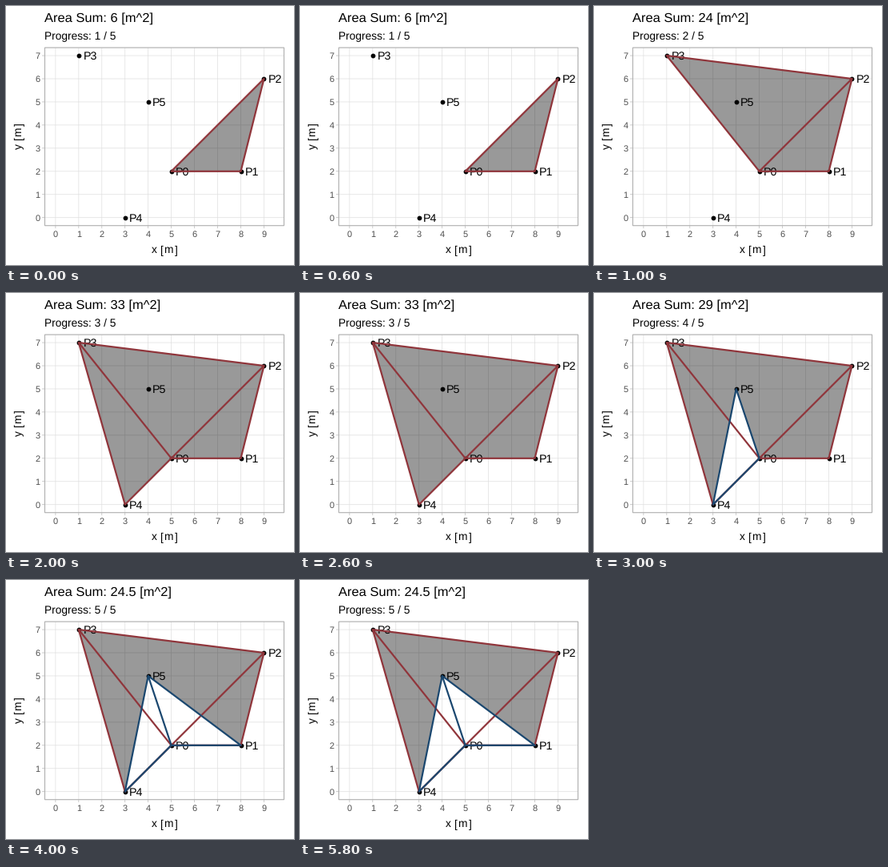
Recreate the animation shown at these times as a matplotlib script. Size 360 by 324 pixels, loop 7000 ms.

```python
import matplotlib.pyplot as plt
import numpy as np
from matplotlib.animation import FuncAnimation

W, H, DPI = 360, 324, 90
PX = 72 / DPI  # points per pixel
STEP, X0, Y0 = 28.95, 61.9, 264.7
LEFT, RIGHT, TOP, BOTTOM = 48.5, 347.5, 52.1, 274.7
RED, BLUE = "#90353b", "#1a476f"
POINTS = np.array([(5, 2), (8, 2), (9, 6), (1, 7), (3, 0), (4, 5)])
TRIANGLES = 5

plt.rcParams.update({"font.family": "Liberation Sans",
                     "text.hinting": "none",
                     "path.snap": False})


def to_px(p):
    return np.asarray(p) * (STEP, -STEP) + (X0, Y0)


def signed_area(a, b, c):
    (ux, uy), (vx, vy) = b - a, c - a
    return (ux * vy - uy * vx) / 2


def fan(i):
    """Corner indices of the i-th triangle around P0."""
    return [0, i + 1, (i + 1) % TRIANGLES + 1]


fig = plt.figure(figsize=(W / DPI, H / DPI), dpi=DPI, facecolor="white")
ax = fig.add_axes([0, 0, 1, 1])
ax.set(xlim=(0, W), ylim=(H, 0))
ax.axis("off")


def line(x, y, color, width, z):
    ax.plot(x, y, color=color, lw=width * PX, zorder=z, solid_capstyle="butt")


def label(x, y, s, size=11, color="black", **kw):
    return ax.text(x, y, s, fontsize=size, color=color, zorder=4, **kw)


def with_unit(name):
    return rf"$\mathregular{{{name}\ [\hspace{{0.1}}m\hspace{{0.1}}]}}$"


def draw_axes():
    tick = 3.4
    for n in range(10):
        x = X0 + n * STEP
        line([x, x], [TOP, BOTTOM], "#dedede", 0.67, 1)
        line([x, x], [BOTTOM, BOTTOM + tick], "#b3b3b3", 0.67, 1)
        label(x, 289.3, str(n), 8.8, "#4d4d4d", ha="center")
    for n in range(8):
        y = Y0 - n * STEP
        line([LEFT, RIGHT], [y, y], "#dedede", 0.67, 1)
        line([LEFT - tick, LEFT], [y, y], "#b3b3b3", 0.67, 1)
        label(42.4, y + 4, str(n), 8.8, "#4d4d4d", ha="right")
    ax.add_patch(plt.Rectangle((LEFT, TOP), RIGHT - LEFT, BOTTOM - TOP,
                               fill=False, ec="#b3b3b3", lw=1.2 * PX, zorder=2))
    label(198, 310, with_unit("x"), ha="center")
    label(26, 163.4, with_unit("y"), rotation=90, ha="right", va="center")


def draw_points():
    xy = to_px(POINTS)
    ax.plot(*xy.T, "o", color="black", ms=5.8 * PX, mew=0, zorder=3)
    for i, (x, y) in enumerate(xy):
        label(x + 5.5, y + 5.2, f"P{i}", 11.4)


draw_axes()
draw_points()
title = label(48.5, 20, "", 13.2)
subtitle = label(48.5, 42, "")
surface = plt.Polygon(to_px(POINTS[:3]), fc="black", alpha=0.4, lw=0, zorder=5)
ax.add_patch(surface)

areas, edges = [], []
last_color = None
for i in range(TRIANGLES):
    tri = POINTS[fan(i)]
    areas.append(signed_area(*tri))
    color = RED if areas[-1] > 0 else BLUE
    # the side shared with the previous triangle is redrawn only in a new colour
    path = np.roll(tri, -1, axis=0)
    edge = plt.Polygon(to_px(path), closed=color != last_color, fill=False,
                       ec=color, lw=2.2 * PX, joinstyle="round",
                       capstyle="round", zorder=6 + i)
    edges.append(ax.add_patch(edge))
    last_color = color


def update(frame):
    done = min(frame + 1, TRIANGLES)
    title.set_text(f"Area Sum: {sum(areas[:done]):g} [m^2]")
    subtitle.set_text(f"Progress: {done} / {TRIANGLES}")
    # the last triangle closes the ring, so P0 drops out of the outline
    ring = POINTS[1:] if done == TRIANGLES else POINTS[:done + 2]
    surface.set_xy(to_px(ring))
    for i, edge in enumerate(edges):
        edge.set_visible(i < done)
    return [title, subtitle, surface, *edges]


anim = FuncAnimation(fig, update, frames=7, interval=1000, repeat=True,
                     repeat_delay=0, init_func=lambda: update(0))
plt.show()
```
